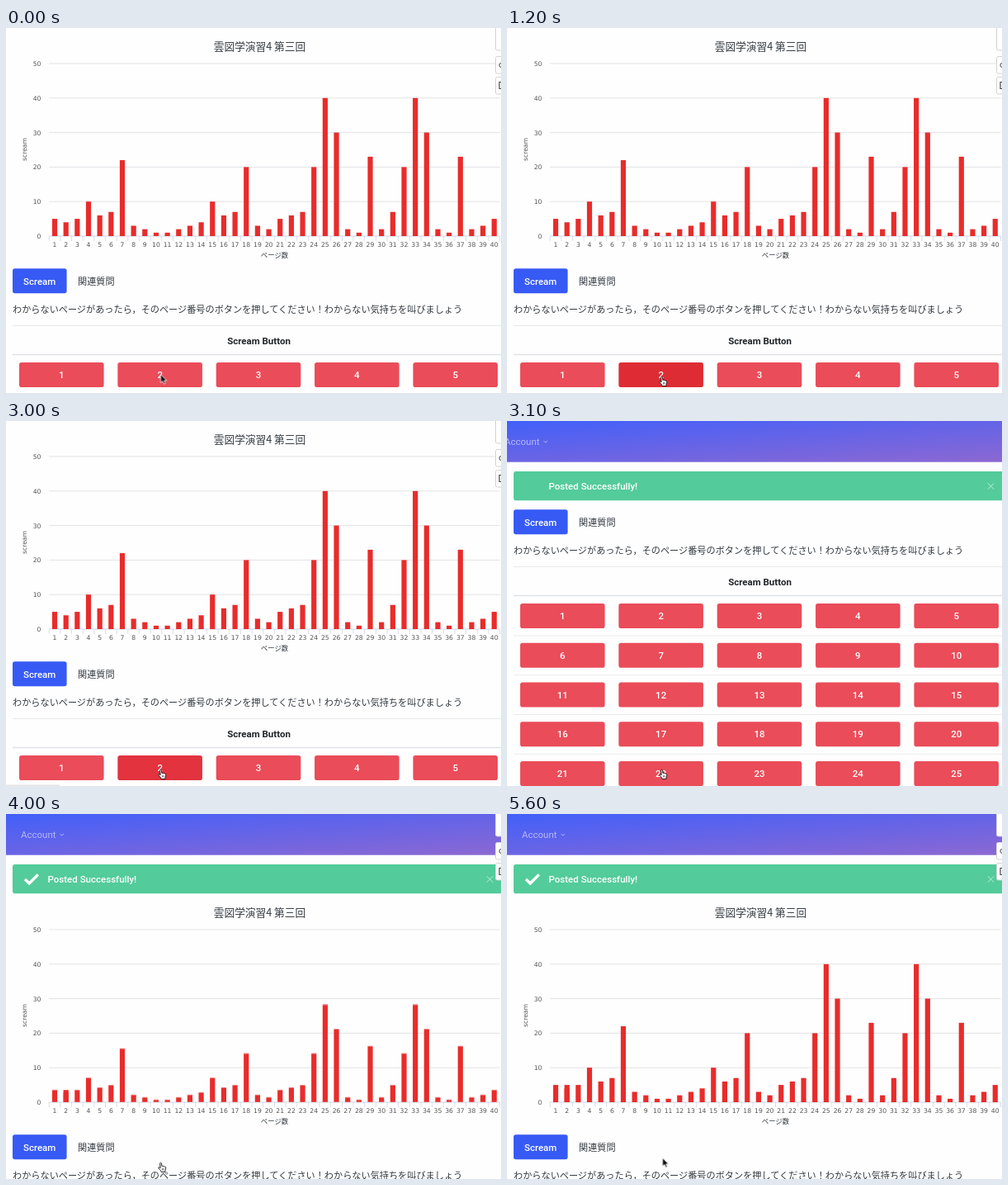
These frames come from a looping animation (600x442 px, 5.7 s). An HTML page:

```html
<!DOCTYPE html>
<html lang="ja">
<head>
<meta charset="utf-8">
<title>Scream board</title>
<style>
html, body { margin: 0; width: 100%; height: 100%; overflow: hidden; background: #fefefe; }
svg { display: block; width: 600px; height: 442px; }
text { font-family: Roboto, "Noto Sans CJK JP", "Noto Sans CJK", sans-serif; font-size: 11.5px; }
.jp { font-family: "Noto Sans CJK JP", "Noto Sans CJK", sans-serif; font-size: 11.17px; fill: #343a40; }
.axis { font-family: "DejaVu Sans", sans-serif; font-size: 7.7px; fill: #555; }
.mid { text-anchor: middle; }
.end { text-anchor: end; }
.label { fill: #fff; font-weight: 500; text-anchor: middle; }
.btn { fill: #ea4c59; }

/* One 5.7 s loop, held in 100 ms steps */
.chart, .lower, .after, .icon, .account, .bars, .press, .status, .tools, .arrow, .hand {
  animation: 5.7s step-end infinite;
}
.chart { animation-name: chart; }
.lower { animation-name: lower; }
.after { animation-name: after; }
.icon { animation-name: icon; }
.account { animation-name: account; }
.bars { animation-name: grow; }
.press { animation-name: press; }
.status { animation-name: status; }
.tools { animation-name: tools; }
.arrow { animation-name: arrow; }
.hand { animation-name: hand; }

@keyframes chart {
  0% { transform: none; visibility: visible; }
  54.38% { transform: translateY(97px); visibility: hidden; }
  59.64%, 100% { transform: translateY(97px); visibility: visible; }
}
@keyframes lower {
  0% { transform: none; }
  54.38% { transform: translateY(-184px); }
  59.64%, 100% { transform: translateY(97px); }
}
@keyframes after { 0% { opacity: 0; } 54.38%, 100% { opacity: 1; } }
@keyframes icon { 0% { opacity: 0; } 57.89%, 100% { opacity: 1; } }
@keyframes account { 0% { transform: translateX(-21px); } 57.89%, 100% { transform: none; } }
@keyframes tools { 0% { opacity: 1; } 54.38% { opacity: 0; } 59.64%, 100% { opacity: 1; } }
@keyframes status { 0% { opacity: 0; } 50.87% { opacity: 1; } 54.38%, 100% { opacity: 0; } }
@keyframes press {
  0% { fill: #ea4c59; }
  7.01% { fill: #e2333f; }
  10.52% { fill: #de2c34; }
  31.57% { fill: #e2333f; }
  54.38%, 100% { fill: #ea4c59; }
}
@keyframes grow {
  0% { transform: scaleY(1); }
  59.64% { transform: scaleY(0); }
  61.40% { transform: scaleY(.032); }
  63.15% { transform: scaleY(.114); }
  64.91% { transform: scaleY(.236); }
  66.66% { transform: scaleY(.386); }
  68.42% { transform: scaleY(.549); }
  70.17% { transform: scaleY(.706); }
  71.92% { transform: scaleY(.842); }
  73.68% { transform: scaleY(.941); }
  75.43% { transform: scaleY(.993); }
  77.19%, 100% { transform: scaleY(1); }
}
@keyframes arrow {
  0% { transform: translate(187.5px, 419.5px); opacity: 1; }
  7.01% { transform: translate(187.5px, 419.5px); opacity: 0; }
  87.71%, 100% { transform: translate(188.5px, 416.5px); opacity: 1; }
}
@keyframes hand { 0% { opacity: 0; } 7.01% { opacity: 1; } 87.71%, 100% { opacity: 0; } }
</style>
</head>
<body>
<svg id="stage" viewBox="0 0 600 442"></svg>
<script>
const votes = [5, 4, 5, 10, 6, 7, 22, 3, 2, 1, 1, 2, 3, 4, 10, 6, 7, 20, 3, 2,
  5, 6, 7, 20, 40, 30, 2, 1, 23, 2, 7, 20, 40, 30, 2, 1, 23, 2, 3, 5];
const LEFT = 52.2, STEP = 13.66, BASE = 252, UNIT = 4.18;

const times = (n, fn) => Array.from({ length: n }, (_, i) => fn(i)).join('');
const rect = (x, y, w, h, attrs = '') => `<rect x="${x}" y="${y}" width="${w}" height="${h}" ${attrs}/>`;
const text = (x, y, str, cls, attrs = '') => `<text x="${x}" y="${y}" class="${cls}" ${attrs}>${str}</text>`;
const center = i => LEFT + STEP * (i + .5);
const bar = (i, v, cls = '') => rect(center(i) - 3.1, -v * UNIT, 6.2, v * UNIT, `fill="#e82c2b" class="${cls}"`);

function chart() {
  const grid = times(6, i => {
    const y = BASE - i * 10 * UNIT;
    return rect(LEFT, y - .5, 546.4, 1, `fill="${i ? '#e3e3e6' : '#ccd6eb'}"`) +
      text(42.5, y + 3, i * 10, 'axis end');
  });
  const ticks = times(41, i => rect(LEFT + STEP * i - .4, BASE, .8, 6, 'fill="#ccd6eb"'));
  const pages = times(40, i => text(center(i), 265.3, i + 1, 'axis mid'));
  return `<g class="chart">
    ${text(307.5, 27, '雲図学演習4 第三回', 'jp mid', 'style="font-size:12.7px"')}
    ${grid}${ticks}${pages}
    ${text(0, 0, 'scream', 'axis mid', 'transform="translate(25 147) rotate(-90)"')}
    ${text(325.5, 278.3, 'ページ数', 'jp mid', 'style="font-size:8.4px"')}
    <g transform="translate(0 ${BASE})"><g class="bars">
      ${votes.map((v, i) => bar(i, v)).join('')}${bar(1, 5, 'after')}
    </g></g>
  </g>`;
}

function button(i) {
  const x = 16 + 119.35 * (i % 5), y = 405 + 47.75 * Math.floor(i / 5);
  return rect(x, y, 102.6, 30, `rx="2.8" class="btn ${i === 1 ? 'press' : ''}"`) +
    text(x + 51.3, y + 19, i + 1, 'label');
}

function lower() {
  return `<g class="lower">
    ${rect(8, 291.3, 65.6, 30, 'rx="2.8" fill="#375af5"')}
    ${text(40.7, 310.6, 'Scream', 'label')}
    ${text(87, 310.6, '関連質問', 'jp')}
    ${text(8, 345, 'わからないページがあったら，そのページ番号のボタンを押してください！わからない気持ちを叫びましょう', 'jp')}
    ${rect(8, 360.2, 592, .8, 'fill="#e2e4e8"')}
    ${text(306.5, 382.5, 'Scream Button', 'mid', 'font-weight="700" fill="#212529"')}
    ${rect(8, 394.8, 592, 1.4, 'fill="#dee2e6"')}
    ${times(4, i => rect(8, 443.6 + 47.75 * i, 592, .8, 'fill="#e4e6ea"'))}
    ${times(25, button)}
  </g>`;
}

function header() {
  return `<g class="after">
    ${rect(0, 0, 600, 49.7, 'fill="url(#sky)"')}
    <g class="account" opacity=".55">
      ${text(18, 28.7, 'Account', '', 'fill="#fff"')}
      <path d="M65.5 24l2.2 2.2 2.2-2.2" fill="none" stroke="#fff"/>
    </g>
    ${rect(8, 61, 600, 35.2, 'rx="2.8" fill="#53cb9a"')}
    <path class="icon" d="M23 79l5.2 5 10.6-10.6" fill="none" stroke="#fff" stroke-width="3.4"/>
    ${text(50.5, 82.8, 'Posted Successfully!', '', 'fill="#fff" font-weight="500"')}
    <path d="M582.8 75.3l7.4 7.4m0-7.4l-7.4 7.4" stroke="#fff" stroke-opacity=".6"/>
  </g>`;
}

function tools() {
  const box = (y, h) => rect(593.5, y, 20, h, 'rx="2" fill="#fff" stroke="#d2d2d4"');
  return `<g class="tools">
    ${box(-5, 32)}${box(34.5, 20.5)}${box(59.5, 20.5)}
    <circle cx="600.5" cy="45" r="2.6" fill="none" stroke="#444"/>
    <path d="M602 65.5h-4v8h4" fill="none" stroke="#444" stroke-width="1.2"/>
  </g>`;
}

function cursors() {
  return `<path class="arrow" d="M0 0V10.2L2.4 8 4 11.6 5.7 10.8 4.2 7.4H7.4Z"
      fill="#111" stroke="#fff" stroke-width=".8"/>
    <g class="hand"><path transform="translate(184 421.5)" fill="#fff" stroke="#111" stroke-width=".9" stroke-linejoin="round"
      d="M2.6 1.4Q3.5 0 4.4 1.4L4.9 5Q6 4 6.7 5.2Q7.8 4.5 8.3 5.7Q9.8 5.4 9.8 7.2L9 10.2V12H4.2L3.5 10.3L.6 7.3Q.7 5.8 2.2 6.5L3.2 7.3Z"/>
      <path d="M189.6 429v2.6m1.5-2.6v2.6" stroke="#111" stroke-width=".6"/></g>`;
}

document.getElementById('stage').innerHTML = `
  <defs><linearGradient id="sky" gradientUnits="userSpaceOnUse" x1="0" y1="0" x2="6.2" y2="90.5">
    <stop stop-color="#4260fa"/><stop offset="1" stop-color="#8c68d2"/>
  </linearGradient></defs>
  ${chart()}${lower()}${header()}${tools()}
  ${rect(0, 440.4, 65, 1.6, 'fill="#e6e6e8" class="status"')}
  ${cursors()}`;
</script>
</body>
</html>
```
